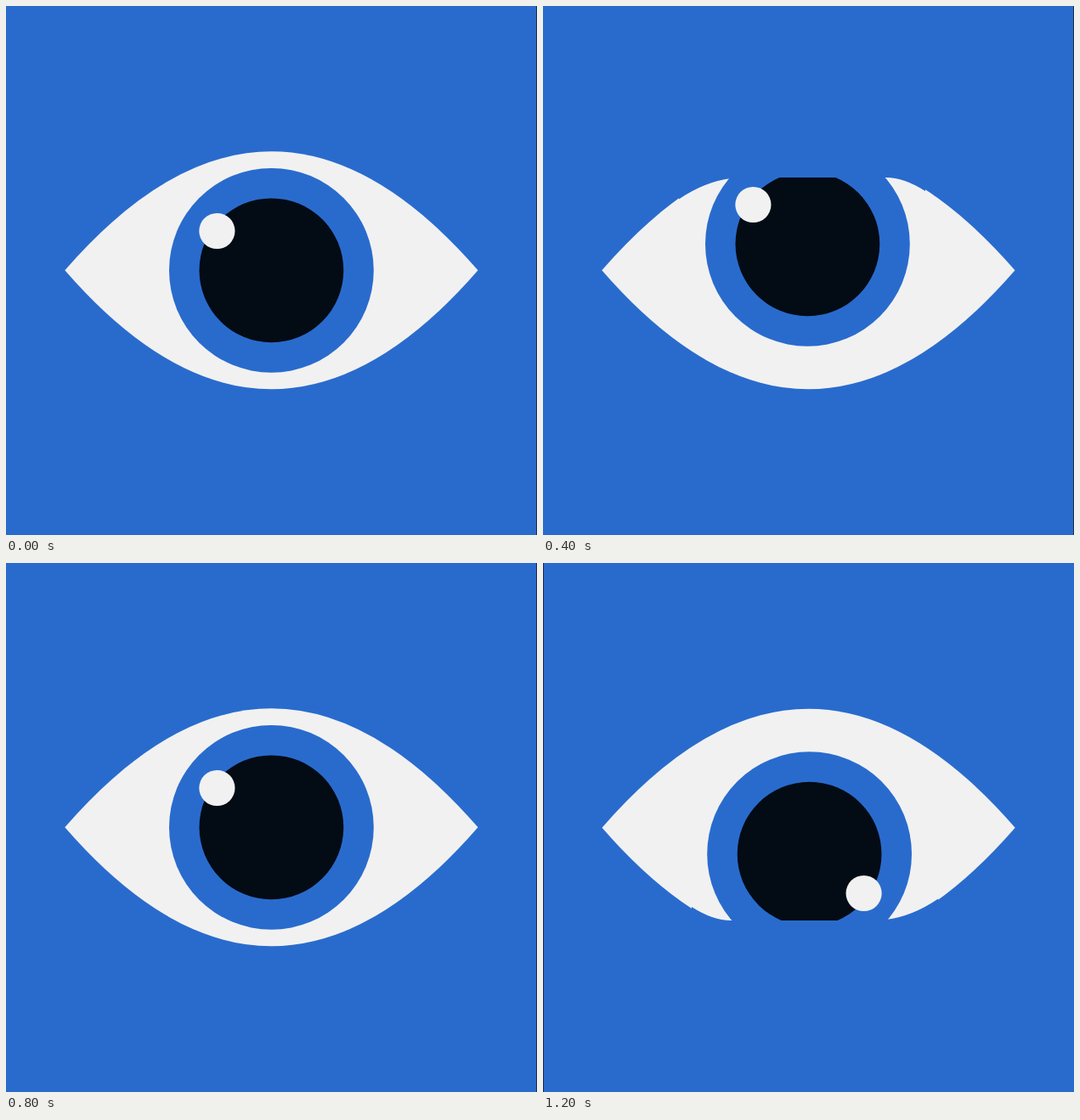
These frames come from a looping animation (625x623 px, 1400 ms). An HTML page:

```html
<!DOCTYPE html>
<html lang="en">
<head>
<meta charset="utf-8">
<title>Eye</title>
<style>
html, body { margin: 0; height: 100%; overflow: hidden; background: #296bcd; }
svg { display: block; width: 100vw; height: 100vh; }
</style>
</head>
<body>
<svg viewBox="0 0 625 623" preserveAspectRatio="none">
  <g id="eye">
    <path fill="#1c2b45" d="M624 0h1v623h-1z"/>
    <path fill="#f1f1f1" d="M69.3 311.3Q312.4 31.3 555.5 311.3Q312.4 591.3 69.3 311.3Z"/>
    <g id="iris">
      <circle cx="312.4" cy="311.3" r="120.4" fill="#296bcd"/>
      <circle cx="312.4" cy="311.3" r="84.9" fill="#030b15"/>
      <circle cx="248.4" cy="265" r="21.1" fill="#f1f1f1"/>
    </g>
    <path id="lid" fill="#296bcd"/>
  </g>
</svg>
<script>
const STEP = 200;
const lids = [
  "",
  "M150 150L160 227.5Q195 204 232 206L388 202C402 198 418 200 450 218V150Z",
  "M150 150L160 227.5Q190 207 221 203V202H404Q425 202 450 218V150Z"
];
const shifts = [[0, 0], [0, -18.1], [-1, -31]];
// Looking up and back, then down with the whole eye turned over
const poses = [0, 1, 2, 1, 0, 1, 2];
const [eye, iris, lid] = ["eye", "iris", "lid"].map(id => document.getElementById(id));

function draw(now) {
  const i = Math.floor(now / STEP) % poses.length;
  const pose = poses[i];
  eye.setAttribute("transform", i > 4 ? "rotate(180 312.5 311.5)" : "");
  iris.setAttribute("transform", `translate(${shifts[pose]})`);
  lid.setAttribute("d", lids[pose]);
}

const start = performance.now();
function tick() {
  draw(performance.now() - start);
  requestAnimationFrame(tick);
}
tick();
</script>
</body>
</html>
```
